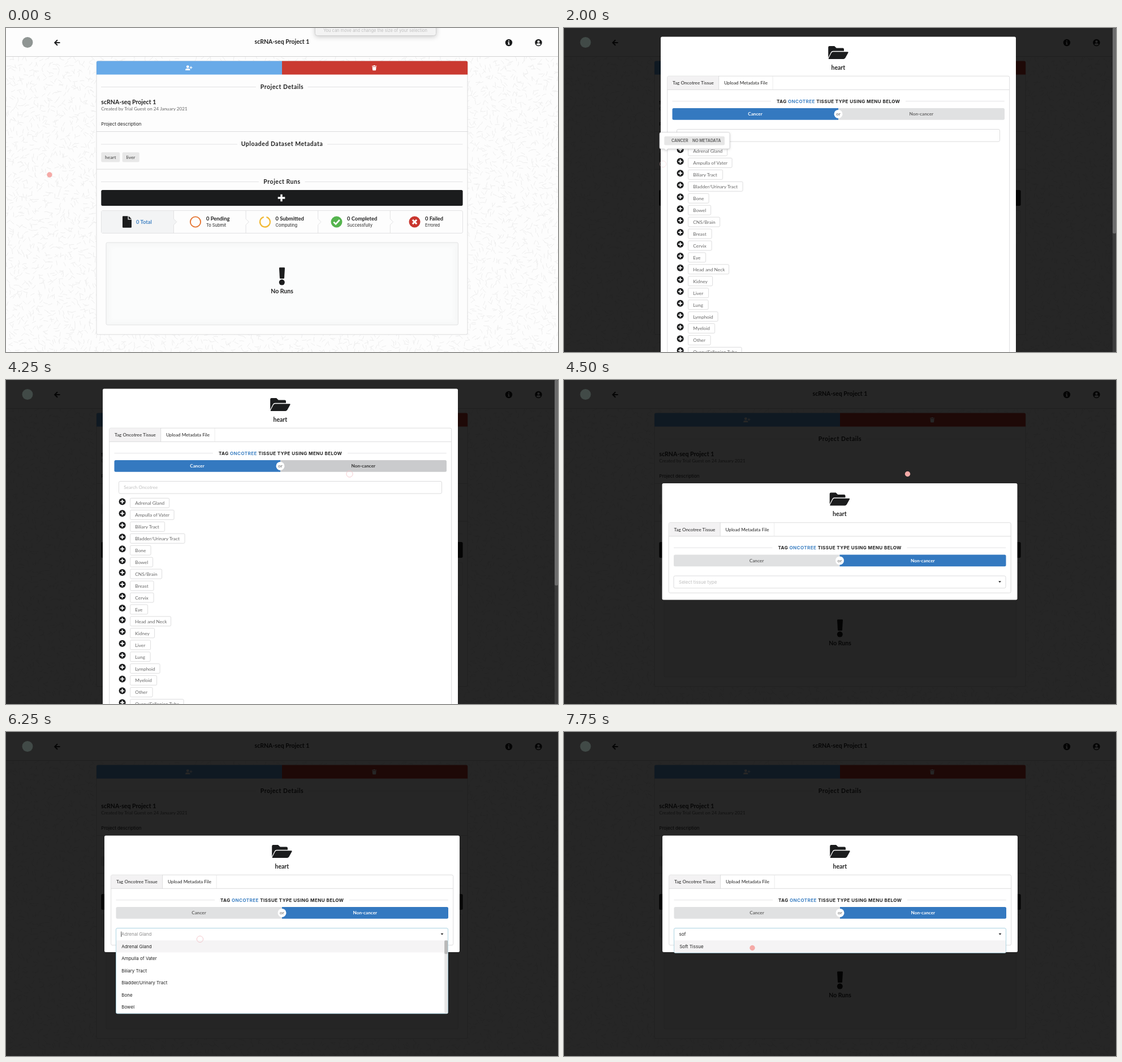
An HTML page that plays this animation: 976 by 574 pixels, repeating every 8 s.

```html
<!DOCTYPE html>
<html lang="en">
<head>
<meta charset="utf-8">
<title>Project page</title>
<style>
html, body { margin: 0; width: 100%; height: 100%; overflow: hidden; background: #fdfdfd; }
svg { display: block; width: 976px; height: 574px; font-family: Lato, sans-serif; }
text { fill: #212121; white-space: pre; }
.b { font-weight: 700; }
.m { text-anchor: middle; }
.i { font-family: Inter, sans-serif; }
.h { letter-spacing: .05em; }
.g { fill: #666; }
.w { fill: #fff; }
.p { fill: #bfbfbf; }
</style>
</head>
<body>
<svg id="stage" viewBox="0 0 976 574"></svg>
<script>
const LOOP = 8000, STEP = 250;
const INK = '#1b1c1d', LINE = '#dcdcdd', EDGE = '#d4d4d5', BLUE = '#3479c0', GREY = '#e0e1e2';

const text = (x, y, size, str, cls = '') => `<text x="${x}" y="${y}" font-size="${size}" class="${cls}">${str}</text>`;
const rect = (x, y, w, h, fill, more = '') => `<rect x="${x}" y="${y}" width="${w}" height="${h}" fill="${fill}" ${more}/>`;
const box = (x, y, w, h, fill = '#fff', stroke = EDGE, r = 2.5) => rect(x, y, w, h, fill, `rx="${r}" stroke="${stroke}" stroke-width=".8"`);
const disc = (x, y, r, fill, more = '') => `<circle cx="${x}" cy="${y}" r="${r}" fill="${fill}" ${more}/>`;
const shape = (d, fill = INK) => `<path d="${d}" fill="${fill}"/>`;
const stroke = (d, color = LINE, w = .8) => `<path d="${d}" fill="none" stroke="${color}" stroke-width="${w}"/>`;
const group = (id, body, more = '') => `<g id="${id}" ${more}>${body}</g>`;

function backdrop() {
  let seed = 7, d = '';
  const rnd = () => (seed = (seed * 16807) % 2147483647) / 2147483647;
  for (let y = 54; y < 580; y += 9) {
    for (let x = 0; x < 980; x += 9) {
      const a = rnd() * 6.283, px = x + rnd() * 7, py = y + rnd() * 7, k = rnd() * 4 - 2;
      if (px > 168 && px < 808 && py > 66 && py < 536) continue;
      const c = Math.cos(a) * 4, s = Math.sin(a) * 4;
      d += `M${px.toFixed(1)} ${py.toFixed(1)}q${(c - s * k / 4).toFixed(1)} ${(s + c * k / 4).toFixed(1)} ${(2 * c).toFixed(1)} ${(2 * s).toFixed(1)}`;
    }
  }
  return rect(0, 0, 976, 574, '#fdfdfd') + stroke(d, '#eeeeee', 1);
}

function header() {
  return rect(0, 0, 976, 50, '#fdfdfd') + stroke('M0 50.5H976', '#d2d2d3', 1)
    + disc(38, 25.5, 9.5, '#8f9593', 'id="mark"')
    + stroke('M95.5 26H87M91 21.2L86.2 26L91 30.8', INK, 2)
    + text(488, 28, 10.55, 'scRNA-seq Project 1', 'b m')
    + disc(889, 26, 6.2, INK) + disc(889, 23, 1.1, '#fff') + shape('M887.4 25h2.5v3.4h.8v1.2h-3.4v-1.2h.8v-2.2h-.7z', '#fff')
    + disc(941.5, 26, 6.2, INK) + disc(941.5, 24.1, 2.2, '#fff') + shape('M937.7 29.2q.4-2.1 3.8-2.1t3.8 2.1q-3.8 3-7.6 0z', '#fff');
}

function heading(y, label, left, right) {
  return stroke(`M168 ${y}H${left}M${right} ${y}H807.5`) + text(488, y + 3, 10.5, label, 'b m h');
}

function steps() {
  const cells = [
    [354, '0 Pending', 'To Submit'], [476.5, '0 Submitted', 'Computing'],
    [603, '0 Completed', 'Successfully'], [741, '0 Failed', 'Errored']
  ];
  let s = box(168.5, 323.5, 639, 40, '#fdfdfd', LINE);
  s += shape('M169 324H296.5V338L302 343.5L296.5 349V363H169z', '#f3f4f5');
  for (let i = 0; i < 4; i++) {
    const x = 296.5 + i * 127.6;
    s += stroke(`M${x} 323.5V338.2L${x + 5.3} 343.5L${x} 348.8V363.5`);
  }
  s += shape('M206 334.5q0-1.2 1.2-1.2H215.5V339.5H222V352.6q0 1.2-1.2 1.2H207.2q-1.2 0-1.2-1.2zM216.8 333.3L222 338.3H216.8z')
    + text(230, 347, 9.35, '0 Total', 'b').replace('<text', '<text style="fill:#4183c4"');
  for (const [x, a, b] of cells) s += text(x, 341.3, 9.35, a, 'b') + text(x, 352, 7.45, b, 'i');
  return s
    + disc(335, 343.5, 9.1, 'none', 'stroke="#e5732f" stroke-width="1.9"')
    + disc(458, 343.5, 9, 'none', 'stroke="#f2b935" stroke-width="2.3" stroke-dasharray="51.5 5.05" transform="rotate(-74 458 343.5)"')
    + disc(584.5, 343.5, 10, '#55b44e') + stroke('M579.3 343.8L583 347.4L589.8 340', '#fff', 2.6)
    + disc(722.5, 343.5, 10, '#c9362f') + stroke('M718.9 339.9L726.1 347.1M726.1 339.9L718.9 347.1', '#fff', 2.9);
}

function emptyRuns() {
  let s = box(177, 380, 622.5, 146, '#f6f7f7', '#dcdcdd');
  for (let i = 1; i < 6; i++) s += rect(177 + i * 2, 380 + i * 2, 622.5 - i * 4, 146 - i * 4, '#fff', `rx="${2 + i}" opacity=".15"`);
  return s + shape('M483 425.5q0-1.2 1.2-1.2h7.6q1.2 0 1.2 1.2L492 442.8q-.1 1.2-1.2 1.2h-5.600q-1.100 0-1.200-1.200z')
    + disc(487.8, 450.6, 5, INK) + text(488, 470.3, 10.5, 'No Runs', 'b m');
}

function card() {
  return box(160, 58.7, 656, 484.3, '#fdfdfd', EDGE)
    + shape('M160 82.500V61q0-2.500 2.500-2.500H488V82.500z', '#68aae8')
    + shape('M488 82.500V58.500H813.700q2.500 0 2.500 2.500V82.500z', '#ca3a31')
    + disc(321.300, 68.600, 2.400, '#fff') + shape('M317.200 75v-.9q0-2.400 2.500-2.400h3.200q2.500 0 2.500 2.400v.9z', '#fff')
    + stroke('M327 67.700v4.800M324.700 70.100h4.700', '#fff', 1.200)
    + shape('M647 67h2.600l.6-.9h1.800l.6.9h2.600v1.200h-8.200zM647.600 69h7l-.5 5.300q-.1.900-1 .9h-4q-.9 0-1-.9z', '#fff')
    + heading(104.500, 'Project Details', 442, 533.500)
    + text(168.300, 135.300, 10.55, 'scRNA-seq Project 1', 'b')
    + text(168.300, 146, 8.2, 'Created by Trial Guest on 24 January 2021', 'g')
    + text(168.300, 172.700, 8, 'Project description', 'i')
    + stroke('M160 183.500H816M160 250.200H816', EDGE)
    + heading(206, 'Uploaded Dataset Metadata', 409, 568)
    + rect(168.300, 220.200, 33, 17.300, '#e8e8e8', 'rx="2" id="tag"') + text(184.800, 231.800, 8.3, 'heart', 'b m g').replace('<text', '<text id="tagText"')
    + rect(205.700, 220.200, 30, 17.300, '#e8e8e8', 'rx="2"') + text(220.500, 231.800, 8.3, 'liver', 'b m g')
    + heading(272.500, 'Project Runs', 447, 528.500)
    + rect(168.300, 287, 639.300, 28, INK, 'rx="2.500"')
    + stroke('M487 294.700v12.600M480.700 301h12.600', '#fff', 3.300)
    + steps() + emptyRuns();
}

const tissues = {
  'Adrenal Gland': 69, 'Ampulla of Vater': 77.5, 'Biliary Tract': 61, 'Bladder/Urinary Tract': 96.5, 'Bone': 36.5,
  'Bowel': 40, 'CNS/Brain': 56, 'Breast': 41.5, 'Cervix': 41.5, 'Eye': 31, 'Head and Neck': 72, 'Kidney': 43,
  'Liver': 36, 'Lung': 35.5, 'Lymphoid': 52.5, 'Myeloid': 47, 'Other': 39.5, 'Ovary/Fallopian Tube': 94.5
};

function tree() {
  let s = box(199.5, 179.5, 571, 21.7) + text(208.3, 193.3, 8.2, 'Search Oncotree', 'p');
  Object.entries(tissues).forEach(([name, w], i) => {
    const y = 215.4 + i * 20.95;
    s += disc(205.6, y, 6, INK) + stroke(`M205.6 ${y - 3.5}v7M202.1 ${y}h7`, '#fff', 1.9)
      + box(219.6, y - 6, w, 17, '#fff', EDGE, 2) + text(228.3, y + 5.8, 8.35, name, 'g');
  });
  return s;
}

function modal() {
  return rect(171, 15.5, 628, 206.500, '#fff', 'rx="2.500" id="sheet"')
    + shape('M467.200 52.500V34.300q0-2.200 2.200-2.200h8.700l3.600 3.500h11.100q2.200 0 2.200 2.200v3H475.600q-2.400 0-3.600 2.100z')
    + shape('M475.700 42.300h25.900q1.700 0 .9 1.500l-5.100 9.300q-1 1.800-3 1.800H468.800q-1.700 0-.9-1.500l5-9.300q.9-1.800 2.800-1.800z')
    + text(484.800, 73.700, 10.5, 'heart', 'b m')
    + rect(182.700, 85.200, 605, 124.500, '#fff', `id="frame" rx="2.500" stroke="${EDGE}" stroke-width=".8"`)
    + rect(183.100, 85.600, 90.400, 23.600, '#f3f2f3') + stroke('M182.700 109.300H787.700M273.700 85.200V109.300', EDGE) + stroke('M369.200 85.200V109.300', '#e6e6e7')
    + text(228.500, 100, 8.2, 'Tag Oncotree Tissue', 'm') + text(321.500, 100, 8.2, 'Upload Metadata File', 'm')
    + stroke('M191.500 129.700H366M604 129.700H778.700')
    + text(485.200, 132.500, 8.05, 'TAG <tspan fill="#4183c4">ONCOTREE</tspan> TISSUE TYPE USING MENU BELOW', 'b m h i')
    + shape('M485 142V162.800H194q-2.500 0-2.500-2.500V144.500q0-2.500 2.500-2.500z', BLUE).replace('<path', '<path id="left"')
    + shape('M485 142V162.800H776.500q2.500 0 2.500-2.500V144.500q0-2.500-2.500-2.500z', GREY).replace('<path', '<path id="right"')
    + text(338, 155.300, 8.2, 'Cancer', 'b m').replace('<text', '<text id="leftText"')
    + text(631.800, 155.300, 8.2, 'Non-cancer', 'b m').replace('<text', '<text id="rightText"')
    + disc(485, 152.400, 7.500, '#fff') + text(485, 155.200, 8.2, 'or', 'b m').replace('<text', '<text style="fill:#888"')
    + group('tree', tree()) + group('pick', '');
}

function popup() {
  return `<g style="filter:drop-shadow(0 1px 2px rgba(34,36,38,.25))">`
    + shape('M171.500 185H290.500q2.500 0 2.500 2.500V211.500q0 2.500-2.500 2.500H183.500l-3 3.200l-3-3.200H171.500q-2.500 0-2.500-2.500V187.500q0-2.500 2.500-2.500z', '#fff') + '</g>'
    + stroke('M171.500 185H290.500q2.500 0 2.500 2.500V211.500q0 2.500-2.500 2.500H183.500l-3 3.200l-3-3.200H171.500q-2.500 0-2.500-2.500V187.500q0-2.500 2.500-2.500z', '#d0d0d1', .7)
    + rect(177.300, 192, 106.700, 15.600, '#e6e6e6', 'rx="2"')
    + text(190, 202.300, 7, 'CANCER', 'b i g') + text(227, 202.300, 6.9, 'NO METADATA', 'b i g');
}

function tip() {
  return rect(546.500, -12, 214, 25.500, '#f3f3f3', 'rx="4" stroke="#c9c9c9" stroke-width=".8" style="filter:drop-shadow(0 2px 4px rgba(0,0,0,.2))"')
    + text(653, 7, 7.46, 'You can move and change the size of your selection', 'i m p');
}

const $ = id => document.getElementById(id);
$('stage').innerHTML = backdrop() + header() + card() + group('tip', tip())
  + group('dim', rect(0, 0, 976, 574, '#000', 'opacity=".85"') + disc(38, 25.500, 9.500, '#414a47'))
  + group('bar', rect(970, 0, 6, 574, '#3c3c3c') + rect(970, 0, 6, 364, '#6c6c6c', 'rx="2"'))
  + group('modal', modal()) + group('pop', popup()) + disc(0, 0, 4.700, '#f5aaa7', 'id="cursor"');

// Dropdown in modal coordinates; query is null while closed.
function picker(query) {
  const caret = shape('M765.600 188.800h4.800l-2.400 2.700z');
  if (query === null) return box(191.500, 179.500, 587, 21.700) + text(200.500, 193, 8, 'Select tissue type', 'i p') + caret;
  const found = {
    '': Object.keys(tissues).slice(0, 6),
    s: ['Esophagus/Stomach', 'Skin', 'Soft Tissue']
  }[query] || ['Soft Tissue'];
  const h = found.length * 21.500 + .7;
  let s = box(191.500, 179.500, 587, 21.700 + h, '#fff', '#96c8da') + rect(191.900, 201.200, 586.200, 21.300, '#f5f4f5');
  found.forEach((name, i) => s += text(201.200, 214.600 + i * 21.500, 8, name, 'i'));
  if (!query) s += rect(772.200, 201.200, 5.900, h - .4, '#e6e6e6') + rect(772.200, 201.200, 5.900, 24, '#b9b9b9', 'rx="2"') + stroke('M200.800 185.500V195', INK, .8);
  return s + text(query ? 200.500 : 201, 193, 8, query || 'Adrenal Gland', query ? 'i' : 'i p').replace('i p"', 'i" style="fill:#8c8c8c"') + caret;
}

const path = [
  [0, 77, 260], [250, 77, 260], [1500, 175, 241], [2000, 175, 241], [2500, 171, 229], [3750, 612, 144],
  [4250, 607.5, 166.5], [4500, 607.5, 166.5], [5250, 363.5, 356.5], [5750, 343, 367], [7250, 343, 367], [7750, 333, 382.5], [LOOP, 333, 382.5]
];

function place(t) {
  const i = path.findIndex(p => p[0] > t), [a, x, y] = path[i - 1], [b, u, v] = path[i];
  const k = (t - a) / (b - a), e = k * k * (3 - 2 * k);
  return [x + (u - x) * e, y + (v - y) * e];
}

const within = (t, a, b) => t >= a && t < b;
const show = (id, on) => $(id).style.display = on ? '' : 'none';
const set = (id, o) => { for (const k in o) $(id).setAttribute(k, o[k]); };

function draw(t) {
  const open = t >= 2000, small = t >= 4500, over = within(t, 1250, 2500);
  show('tip', t < 500);
  set('tip', { opacity: t < 250 ? 1 : .5 });
  set('tag', { fill: over ? '#c6c6c6' : '#e8e8e8' });
  $('tagText').style.fill = over ? '#333' : '';
  show('pop', within(t, 1500, 2500));
  show('dim', open);
  show('mark', !open);
  show('modal', open);
  show('bar', open && !small);
  show('tree', !small);
  show('pick', small);
  set('modal', { transform: small ? (t < 5500 ? 'translate(2.5 167.5)' : 'translate(3 168)') : '' });
  set('sheet', { height: small ? 206.5 : 600 });
  set('frame', { height: small ? 124.5 : 600 });
  set('left', { fill: small ? GREY : BLUE });
  set('right', { fill: small ? BLUE : t >= 3500 ? '#cacbcd' : GREY });
  $('leftText').style.fill = small ? '#666' : '#fff';
  $('rightText').style.fill = small ? '#fff' : t >= 3500 ? '#333' : '#666';
  if (small) $('pick').innerHTML = picker(t < 6000 ? null : 'sof'.slice(0, Math.max(0, (t - 7000) / STEP)));

  const [x, y] = place(t);
  const press = within(t, 1750, 2250) || within(t, 4250, 4500) || within(t, 6000, 6500);
  set('cursor', {
    cx: x, cy: y, r: press ? 5.6 : 4.7, fill: press ? 'none' : '#f5aaa7',
    stroke: press ? '#f3c3c8' : 'none', 'stroke-width': .9, opacity: within(t, 2000, 2250) ? .5 : 1
  });
}

let last = -1;
function tick() {
  const t = Math.floor(performance.now() % LOOP / STEP) * STEP;
  if (t !== last) draw(last = t);
  requestAnimationFrame(tick);
}
tick();
</script>
</body>
</html>
```
